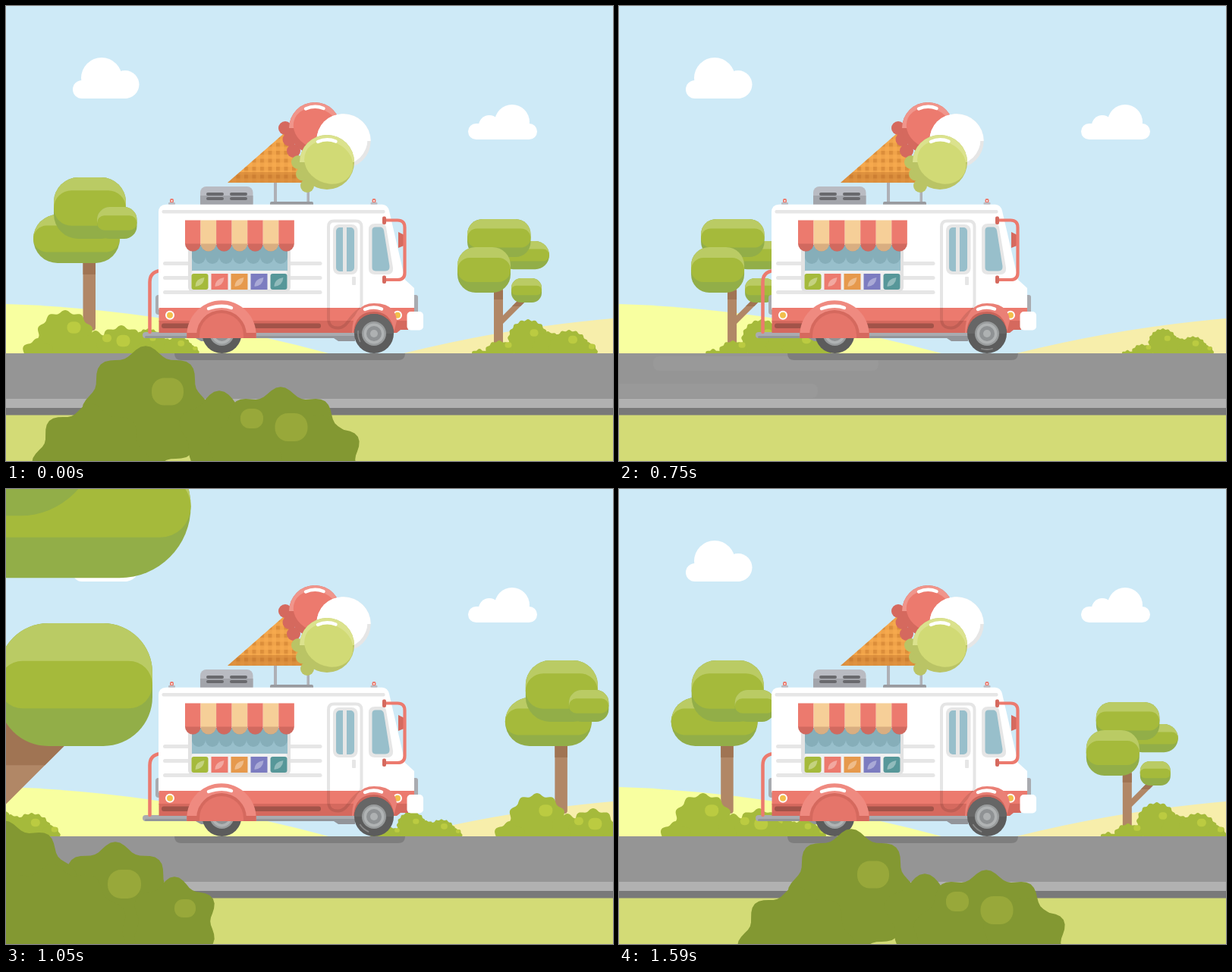
An HTML page for the animation above (1.62 s loop, 800x600 px).

```html
<!DOCTYPE html>
<html lang="en">
<head>
<meta charset="utf-8">
<title>Ice cream truck</title>
<style>
  html, body { margin: 0; width: 800px; height: 600px; overflow: hidden; }
  svg { display: block; }
</style>
</head>
<body>
<svg id="stage" width="800" height="600" viewBox="0 0 800 600"></svg>
<script>
const RED = '#ec7a6e', DARK_RED = '#d5695e', GREY = '#e6e6e6', STEEL = '#a9abb0', GLASS = '#98bfcb';
const LEAF = '#a5ba3b', LEAF_LIGHT = '#bacb64', LEAF_DARK = '#92ae48', SPOT = '#bbcb41';
const HEDGE = '#839832', HEDGE_SPOT = '#98a83a', BARK = '#b18766', BARK_DARK = '#a07453';

// Shape helpers
const box = (x, y, w, h, r, fill) => `<rect x="${x}" y="${y}" width="${w}" height="${h}" rx="${r}" fill="${fill}"/>`;
const disc = (x, y, r, fill) => `<circle cx="${x}" cy="${y}" r="${r}" fill="${fill}"/>`;
const shape = (d, fill) => `<path d="${d}" fill="${fill}"/>`;
const line = (d, color, width) =>
  `<path d="${d}" fill="none" stroke="${color}" stroke-width="${width}" stroke-linecap="round"/>`;
const group = (id, content) => `<g id="${id}">${content}</g>`;
const repeat = (n, draw) => Array.from({ length: n }, (_, i) => draw(i)).join('');

// A circle with a wavy rim: bumps `wave` pixels apart, one of them at the top
function lump(x, y, r, wave, fill) {
  const bumps = Math.round(2 * Math.PI * r / wave), count = bumps * 10;
  const points = Array.from({ length: count }, (_, i) => {
    const angle = 2 * Math.PI * i / count, rim = r + wave * .1 * Math.cos(bumps * angle);
    return `${(x + rim * Math.sin(angle)).toFixed(1)} ${(y - rim * Math.cos(angle)).toFixed(1)}`;
  });
  return shape(`M${points.join('L')}z`, fill);
}
const bush = (fill, wave, ...lumps) => lumps.map(([x, y, r]) => lump(x, y, r, wave, fill)).join('');
const spot = (x, y, w, fill) => box(x - w / 2, y - w * .43, w, w * .86, w * .4, fill);

function crown(x, y, w, h, rounding = .4) {
  const r = h * rounding, inset = 5 + h * .15, core = h - 2 * inset;
  return box(x, y, w, h, r, LEAF_DARK)
    + shape(`M${x} ${y + h / 2}V${y + r}a${r} ${r} 0 0 1 ${r} ${-r}h${w - 2 * r}a${r} ${r} 0 0 1 ${r} ${r}V${y + h / 2}z`, LEAF_LIGHT)
    + box(x, y + inset, w, core, core / 2, LEAF);
}

const roundTree = box(101.5, 330, 16.5, 98, 4, BARK) + box(101.5, 335, 16.5, 19, 0, BARK_DARK)
  + crown(36, 275, 114, 64, .5) + crown(63, 226, 95, 81) + crown(120, 265, 52.5, 42);
const roundBush = bush(LEAF, 21, [78, 440, 37], [42, 460, 20], [118, 452, 22], [152, 455, 32], [180, 458, 13])
  + spot(89.5, 424, 18, SPOT) + spot(133, 438, 12, SPOT) + spot(154.5, 441.5, 18, SPOT);

const branch = width => shape(`M655 419L691 383h${-width}L${655 - width} 419z`, BARK)
  + shape(`M678 396L691 383h${-width}L${678 - width} 396z`, BARK_DARK);
const forkTree = branchWidth => branch(branchWidth) + box(643, 365, 12, 84, 4, BARK) + box(643, 375, 12, 12, 0, BARK_DARK)
  + crown(650, 310, 66, 37.2, .5) + crown(608, 281, 83.5, 50) + crown(595, 318, 70, 60) + crown(666, 359, 40, 32);
const lowBush = bush(LEAF, 9.5, [688, 440, 26], [714, 450, 20], [742, 455, 27], [767, 456, 12], [650, 462, 20], [624, 466, 13])
  + spot(696, 431, 11, SPOT) + spot(747, 440, 12, SPOT) + spot(662, 447, 9, SPOT) + spot(772, 449, 8, SPOT);

const frontBush = bush(HEDGE, 58, [184, 532, 78], [112, 602, 72], [281, 562, 49], [362, 602, 94], [412, 598, 54])
  + spot(213, 508.5, 42, HEDGE_SPOT) + spot(324, 544, 30, HEDGE_SPOT) + spot(376, 555.5, 43, HEDGE_SPOT);
const wideBush = bush(HEDGE, 58, [144, 547, 76], [-2, 536, 93], [222, 570, 53], [60, 600, 100], [-130, 570, 80], [-230, 612, 72], [-308, 612, 42])
  + spot(156, 521, 44, HEDGE_SPOT) + spot(236, 553, 28, HEDGE_SPOT);

const clouds = disc(126, 95, 27, '#fff') + disc(157, 103.5, 18.5, '#fff') + box(88, 98, 80, 24, 12, '#fff')
  + disc(667, 153, 23, '#fff') + disc(637, 158, 14, '#fff') + box(609, 155, 91, 21, 10.5, '#fff');
const hills = shape('M0 393Q210 400 425 458H0z', '#f8ffa0') + shape('M524 458Q660 424 800 412V458z', '#f7eeab');
const road = box(0, 458, 800, 61, 0, '#959595') + box(0, 518, 800, 12.5, 0, '#b1b1b1')
  + box(0, 530, 800, 10, 0, '#797979') + box(0, 539.5, 800, 61, 0, '#d3db76');
const streaks = [0, 1915].map(dx => box(448 + dx, 462, 297, 19, 8, '#999') + box(217 + dx, 498, 448, 19, 8, '#999')).join('');
const shadow = shape('M222 458H526Q526 467 517 467H231Q222 467 222 458z', '#7e7e7e');

// Ice cream on the roof
const scoop = (x, y, r, light, mid, dark) => disc(x, y, r, dark) + shape(`M${x - r} ${y}A${r} ${r} 0 0 1 ${x + r} ${y}z`, light)
  + `<ellipse cx="${x + r * .06}" cy="${y - r * .02}" rx="${r * .92}" ry="${r * .76}" transform="rotate(25 ${x} ${y})" fill="${mid}"/>`
  + line(`M${x - 12} ${y - r * .75}q12 -5 23.5 -.5`, '#fff', 4.5);
const drips = (x, y, dx, dy, fill) => repeat(3, i => disc(x + i * dx, y + i * dy, 9, fill));
const cone = ['#f6a94d', 'url(#waffle)'].map(fill => shape('M292 233L372 163L400 233z', fill)).join('')
  + shape('M308 219H394L400 233H292z', 'rgba(170,95,30,.3)');
const iceCream = cone + drips(368, 161, 5.5, 15, DARK_RED) + scoop(407, 161, 34, '#f0958b', RED, DARK_RED)
  + disc(445, 178, 35.7, GREY) + disc(443, 176, 33.5, '#fff') + shape('M409.3 178A35.7 35.7 0 0 1 480.7 178z', '#fff')
  + drips(385, 206, 6, 15.5, '#bac465') + scoop(423, 206, 36, '#dbe28d', '#d1da75', '#bac465');

const roof = box(353, 232, 4, 28, 0, '#aeb0b6') + box(396.5, 242, 3.5, 18, 0, '#aeb0b6') + box(348, 258, 57, 6, 2, '#989a9f')
  + box(256, 238, 69.5, 30, 8, '#b9bbc2') + box(256, 250, 69.5, 14, 0, '#a2a4aa')
  + repeat(4, i => box(264 + i % 2 * 31, 246 + (i >> 1) * 6, 23, 4, 2, '#69696d'))
  + [218.5, 485].map(x => box(x - 2.5, 254, 5, 6, 2, RED) + disc(x, 257, 1, '#fff') + box(x - 4.5, 259, 9, 3, 1, '#b9bbc2')).join('');

// Serving hatch
const scallop = (x, y, w, bottom, fill) => shape(`M${x} ${y}h${w}V${bottom - w / 2}a${w / 2} ${w / 2} 0 0 1 ${-w} 0z`, fill);
const awning = repeat(7, i => scallop(236 + i * 20.55, 282.5, 20.55, 323.5, i % 2 ? '#f6cf98' : RED)
  + scallop(236 + i * 20.55, 313.5, 20.55, 323.8, 'rgba(90,30,30,.18)'));
const cards = [LEAF, RED, '#e6994c', '#7c7cc0', '#579799'].map((color, i) => box(244.5 + i * 26, 353, 22, 21, i % 4 ? 0 : 3, color)
  + `<path d="M-6 6Q-6 -4 6 -6Q5 5 -6 6" transform="translate(${255.5 + i * 26} 364)" fill="#fff" opacity=".35"/>`).join('');
const hatch = box(240, 315, 135, 62, 6, '#e2e2e2') + box(245, 315, 126, 34, 0, GLASS)
  + repeat(7, i => scallop(245 + i * 18, 315, 18, 340, '#86aeb9')) + box(244.5, 349, 126, 25, 3, '#f1f1f1') + cards + awning;

const shell = box(197, 381, 8, 26, 4, STEEL) + box(535, 381, 8, 26, 3, STEEL)
  + shape('M211 261.7H496Q503 262 505 270L526 361L538 372V400H201V272Q201 262 211 261.7z', '#fff')
  + box(205.5, 269, 294, 4.5, 2, GREY) + repeat(3, i => box(207, 337 + i * 19, 209.5, 5, 2.5, GREY))
  + box(201.5, 398, 336.5, 18, 0, RED) + shape('M201.5 415H530V427H520L515 431H201.5z', DARK_RED)
  + box(205, 418.5, 210, 6.5, 3, '#a25349')
  + [216, 516].map(x => disc(x, 407.7, 6, '#fff') + disc(x, 407.7, 4, '#f2bf4c')).join('');
const door = line('M432 283.5H461Q468.5 283.5 468.5 291V393Q468.5 398 464 402C452 410 450 424 438 424.5Q425 425 425 412V291Q425 283.5 432 283.5z', 'rgba(0,0,0,.1)', 4)
  + box(431, 288, 32.5, 66, 8, GREY) + box(435, 292, 24, 58, 5, GLASS) + box(444, 292, 5, 58, 0, GREY) + box(456, 357, 5, 11, 1, GREY);
const windshield = shape('M486 287H496Q500 287 501 292L510 345Q511 354 502 354H486Q478 354 478 346V295Q478 287 486 287z', GREY)
  + shape('M487 291.5H494Q497 292 498 296L505.5 343Q506 349.5 500 349.5H487Q482.5 349 482.5 345V296Q482.5 291.5 487 291.5z', GLASS);
const mirror = shape('M517 298L527 303V315L517 319z', DARK_RED)
  + line('M499 282.5H516Q525.5 282.5 525.5 292V352Q525.5 361 516 361H499', RED, 4.2)
  + box(496, 277.5, 5, 10.5, 2, DARK_RED) + box(496, 355.5, 5, 10.5, 2, DARK_RED);

const step = box(180, 430, 285, 8, 4, STEEL) + box(183, 435, 280, 3, 1.5, '#92959a')
  + shape('M432 438H460V442H438z', '#92959a') + shape('M250 438H262V442H257z', '#92959a');
const ladder = line('M203 349Q189.5 351 189.5 364V430', RED, 4.5);
const arch = (r, fill) => shape(`M${284 - r} 438V434A${r} ${r} 0 0 1 ${284 + r} 434V438z`, fill);
const rearFender = arch(45.7, '#ef8a80') + shape('M238.3 438V431H329.7V438z', DARK_RED) + arch(33, DARK_RED) + arch(29, '#e5756a')
  + line('M267 399Q284 393 297 398', '#fff', 4.5);
const frontFender = shape('M456 431Q457 392 485 392Q513 392 515 415L511 431z', '#ea8076')
  + shape('M458 431Q460 403 485 403Q508 403 512 431z', '#c9645a') + line('M473 400Q484 395.5 495 399.5', '#fff', 4.5);
const bumper = box(528.5, 403, 21.5, 24.5, 5, '#fff');

const wheel = (id, x) => disc(x, 432, 26, '#5c5c5c') + shape(`M${x - 26} 432a26 26 0 0 1 52 0z`, '#666')
  + disc(x, 432, 16, '#999c9d') + disc(x, 432, 13.5, '#b0b3b4') + disc(x, 432, 10, '#8f9294') + disc(x, 432, 5, '#aeb1b2')
  + group(id, line(`M${x + 20} 425Q${x + 22} 432 ${x + 20} 439`, '#868686', 1.8));

const waffle = `<defs><pattern id="waffle" width="10.5" height="10.5" patternUnits="userSpaceOnUse" x="293" y="170">${
  box(0, 0, 10.5, 5, 0, 'rgba(190,110,35,.1)') + box(0, 0, 5, 10.5, 0, 'rgba(190,110,35,.1)') + box(0, 0, 5, 5, 0, 'rgba(190,110,35,.32)')}</pattern></defs>`;

stage.innerHTML = waffle + box(0, 0, 800, 600, 0, '#ceeaf7') + clouds + hills
  + group('fork', forkTree(11) + lowBush) + group('low', lowBush) + group('round', roundTree + roundBush)
  + road + group('streaks', streaks) + shadow
  + group('upper', roof + iceCream + step + ladder + shell + door + windshield + mirror + hatch) + wheel('rear', 284.5)
  + group('lower', rearFender + frontFender + bumper) + wheel('front', 485)
  + group('near', `<g transform="translate(-3379.4 -1639.5) scale(5.06)">${forkTree(22)}</g>` + wideBush)
  + group('hedge', frontBush);

const STEPS = 54;
const setTransform = (id, value) => document.getElementById(id).setAttribute('transform', value);
const place = (id, x, y = 0, more = '') => setTransform(id, `translate(${x} ${y}) ${more}`);
const spin = (id, angle, x) => setTransform(id, `rotate(${angle} ${x} 432)`);
// Distance travelled, starting again from the right at step `enter`
const travel = (n, speed, enter) => speed * (n >= enter ? STEPS - n : -n);

function draw() {
  const n = Math.floor(performance.now() / 30 + .01) % STEPS;
  // The forked tree loses one step while it passes behind the truck
  const lag = n < 46 ? 20.83 * Math.min(1, Math.max(0, (n - 6) / 12)) : 0;
  place('fork', travel(n, 20.83, 46) + lag);
  // The smaller copy of the bush stands on the road edge at y = 458
  place('low', 130 - 609 * .73 + travel(n, 18.25, 16), 458 * .27, 'scale(.73)');
  place('round', travel(n, 32.73, 28));
  place('streaks', 122 * (6 - n));
  place('near', 245 * (35 - n));
  place('hedge', travel(n, 122, 30));

  const beat = n % 9;
  const bob = beat < 6 ? .9 * Math.sin(Math.PI * beat / 6) : 0;
  place('upper', 0, bob);
  place('lower', 0, bob);
  spin('rear', 325 + 40 * n, 284.5);
  spin('front', 170 + 40 * n, 485);
  requestAnimationFrame(draw);
}
draw();
</script>
</body>
</html>
```
